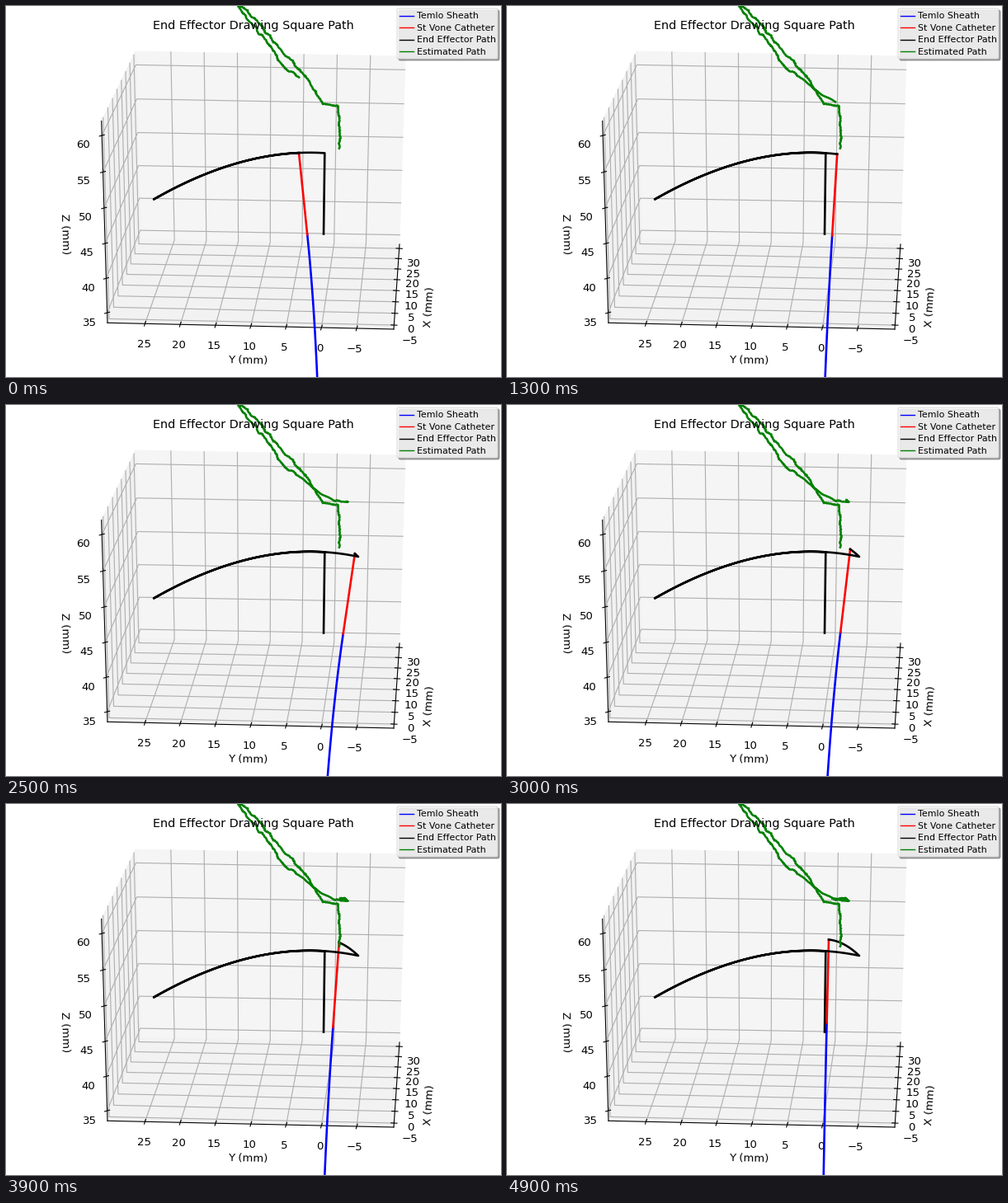
A matplotlib script for the animation above (5 s loop, 600 px wide and 450 px high).

```python
import numpy as np
import matplotlib.pyplot as plt
from matplotlib.animation import FuncAnimation
from matplotlib.patches import FancyBboxPatch, Polygon

W, H, DPI = 600, 450, 100
FRAMES, INTERVAL = 50, 100
PT = 72 / DPI  # points per pixel

plt.rcParams["font.family"] = "DejaVu Sans"
fig = plt.figure(figsize=(W / DPI, H / DPI), dpi=DPI, facecolor="white")
ax = fig.add_axes([0, 0, 1, 1])
ax.set_xlim(0, W)
ax.set_ylim(H, 0)
ax.axis("off")


def line(points, color, width, z):
    return ax.plot(*np.transpose(points), color=color, lw=width * PT, zorder=z,
                   solid_joinstyle="round")[0]


def label(x, y, text, size, z=1.5, ha="center"):
    """Text whose capitals are centred vertically on y."""
    ax.text(x, y + 0.325 * size, text, fontsize=size * PT, ha=ha, va="baseline", zorder=z)


def along(a, b, t, w=1.0):
    """Perspective interpolation from a to b, w being the relative depth of b."""
    a, b = np.array(a, float), np.array(b, float)
    return (a * (1 - t) + b * w * t) / (1 - t + w * t)


# Box corners: front/back, bottom/top, left/right
FBL, FBR, FTL = (123, 384.3), (470, 392), (115.7, 139.5)
BBL, BBR, BTL, BTR = (163, 283.5), (477, 289), (157, 55), (484, 61)
DEPTH, RISE = 1.105, 0.958
TICK_SIZE = 13.2

for corners, shade in (((BBL, BBR, BTR, BTL), "#f5f5f5"),
                       ((FBL, BBL, BTL, FTL), "#f1f1f1"),
                       ((FBL, FBR, BBR, BBL), "#f2f2f2")):
    ax.add_patch(Polygon(corners, facecolor=shade, edgecolor=shade, lw=0.8 * PT, zorder=0))


def axis(edge, others, text_line, depth, first, step, values, mark):
    """One 3D axis: edges given as corner pairs, ticks at first + i * step."""
    line(edge, "black", 1.1, 1)
    for i, value in enumerate(values):
        t = first + step * i
        p = along(*edge, t, depth)
        line([p] + [along(*pair, t, depth) for pair in others], "#b0b0b0", 1.15, 0.5)
        line([p - mark, p + mark], "black", 1.1, 1)
        label(*along(*text_line, t, depth), str(value).replace("-", "\u2212"), TICK_SIZE)


axis((FBL, FBR), [(BBL, BBR), (BTL, BTR)], ((122, 408.7), (467.5, 416.8)),
     1, 0.131, 0.1233, range(25, -10, -5), np.array([-0.9, 2.8]))
axis((FBL, FTL), [(BBL, BTL), (BBR, BTR)], ((102, 396.2), (92.5, 149.6)),
     RISE, 0.052, 0.1758, range(35, 65, 5), np.array([3, -0.8]))
axis((FBR, BBR), [(FBL, BBL), (FTL, BTL)], ((488.9, 411.2), (494.5, 306.7)),
     DEPTH, 0.044, 0.1288, range(-5, 35, 5), np.array([3.6, 0.2]))

for x, y, text, angle in ((293, 430, "Y (mm)", -1.2),
                          (71, 276.5, "Z (mm)", -88.3),
                          (513.5, 365.5, "X (mm)", 86.1)):
    ax.text(x, y, text, fontsize=TICK_SIZE * PT, rotation=angle,
            ha="center", va="center", zorder=1.5)
label(300, 23.2, "End Effector Drawing Square Path", 14.45, z=5)

# Legend: a translucent box over its shadow
for shift, face, edge, alpha in ((2, "0.3", "0.3", 0.5), (0, "white", "0.8", 0.77)):
    ax.add_patch(FancyBboxPatch((474 + shift, 3 + shift), 122, 61,
                                boxstyle="round,pad=0,rounding_size=2", facecolor=face,
                                edgecolor=edge, alpha=alpha, lw=PT, zorder=6))
for i, (color, name) in enumerate((("blue", "Temlo Sheath"), ("red", "St Vone Catheter"),
                                   ("black", "End Effector Path"), ("green", "Estimated Path"))):
    y = 11.9 + 14.4 * i
    line([(477, y), (494, y)], color, 1.4, 7)
    label(498.3, y, name, 11, z=7, ha="left")

# Black path: up the side, out and back along the arc, then the return leg
ARC_END, CORNER_X, TURN = 179, 427, 22
SIDE = np.array([[385, 276.5], [386.3, 178.4]])


def arc(x):
    d = 368 - x
    return 177.8 + 1.735e-3 * d ** 2 - 7.8e-7 * d ** 3


def return_leg(x):
    d = x - 390
    return 164.5 + 0.098 * d + 0.0116 * d ** 2


def trace(curve, start, end):
    xs = np.linspace(start, end, 100)
    return np.c_[xs, curve(xs)]


# Green path: noisy strands through a few points
rng = np.random.default_rng(4)


def wobble(n):
    drift = np.convolve(rng.normal(0, 0.28, n + 6), np.ones(7), "valid")
    return drift + rng.normal(0, 0.25, n)


def strand(points):
    points = np.array(points, float)
    dist = np.r_[0, np.cumsum(np.hypot(*np.diff(points, axis=0).T))]
    s = np.arange(0, dist[-1], 1.1)
    return np.c_[[np.interp(s, dist, v) + wobble(len(s)) for v in points.T]].T


outward = strand([(404, 172), (405, 153), (402.5, 121.5), (384, 119), (372, 97),
                  (340, 61), (303, 17), (279, -6)])
inward = strand([(277, -5), (303, 26), (328, 60), (337, 76), (355, 86)])

SUB = 3
head_time = np.arange(FRAMES * SUB) / SUB
HEAD_KEYS = [0, 8, 13, TURN, 34, FRAMES - 1]
head = np.c_[np.interp(head_time, HEAD_KEYS, [355, 382, 398, 414, 410, 395]),
             np.interp(head_time, HEAD_KEYS, [86, 108, 116, 117.5, 114.5, 115])]
head += 0.5 * np.c_[wobble(len(head)), wobble(len(head))]

LINE = 2.6
origin = [(0, 0)]
sheath = line(origin, "blue", LINE, 2)
catheter = line(origin, "red", LINE, 2.1)
traced = line(origin, "black", LINE, 2.2)
estimate = line(origin, "green", LINE, 2.3)


def update(frame):
    returning = frame > TURN
    tip_x = np.interp(frame, [0, 5, 18, TURN, FRAMES - 1], [355, 371, 418.5, CORNER_X, 390])
    tip = np.array([tip_x, return_leg(tip_x) if returning else arc(tip_x)])

    # The joint and the base follow the tip in proportion
    swing = tip_x - 355
    drop = (0.37 if returning else 0.03) * (CORNER_X - tip_x)
    joint = np.array([365.2 + 0.64 * swing, 279.3 - drop])
    base = np.array([377.3 + 0.183 * swing, 452])
    catheter.set_data(*np.transpose([tip, joint]))

    # The sheath bends smoothly out of the catheter's direction
    bend = joint + (joint - tip) * (355 - joint[1]) / (joint[1] - tip[1])
    s = np.linspace(0, 1, 30)[:, None]
    sheath.set_data(*((1 - s) ** 2 * joint + 2 * s * (1 - s) * bend + s ** 2 * base).T)

    legs = [SIDE, trace(arc, SIDE[1, 0], ARC_END),
            trace(arc, ARC_END, CORNER_X if returning else tip_x)]
    if returning:
        legs.append(trace(return_leg, CORNER_X, tip_x))
    traced.set_data(*np.vstack(legs).T)
    estimate.set_data(*np.vstack([outward, inward, head[:frame * SUB + 1]]).T)
    return sheath, catheter, traced, estimate


anim = FuncAnimation(fig, update, frames=FRAMES, interval=INTERVAL, repeat=True,
                     repeat_delay=0, blit=False)
plt.show()
```
